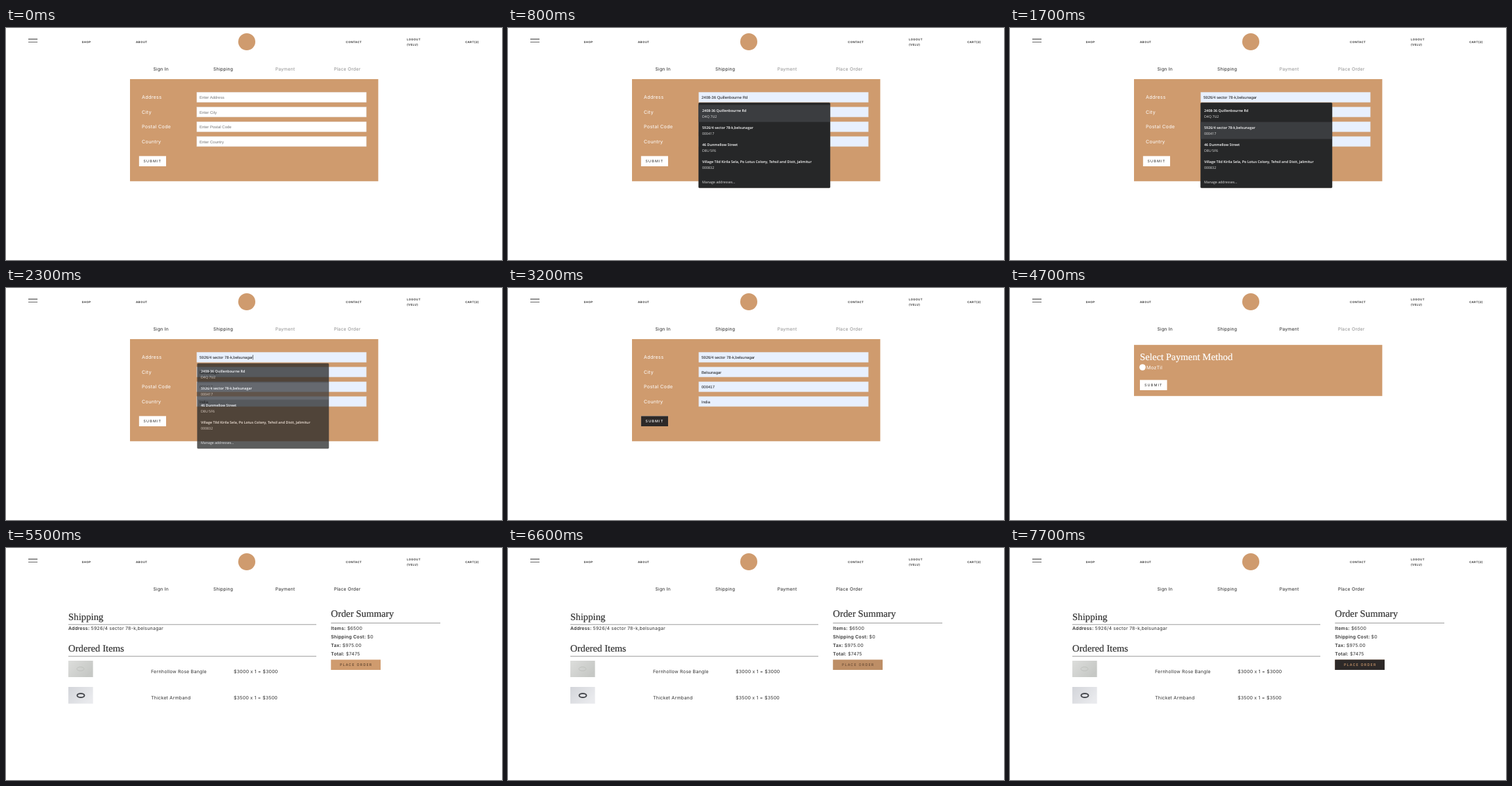
An HTML page that plays this animation: 756x354 px, repeating every 8000 ms.

```html
<!DOCTYPE html>
<html lang="en">
<head>
<meta charset="utf-8">
<title>Checkout</title>
<style>
html, body { margin: 0; width: 100%; height: 100%; overflow: hidden; background: #fff; }
svg { display: block; width: 100%; height: 100%; text-rendering: geometricPrecision; }
text { font-family: Inter, sans-serif; white-space: pre; }
.nav { font-size: 4.4px; font-weight: 600; letter-spacing: .4px; fill: #222; }
.tab { font-size: 6.8px; letter-spacing: .25px; text-anchor: middle; }
.label { font-size: 7.3px; letter-spacing: .25px; fill: #fff; }
.body { font-size: 7.1px; letter-spacing: .2px; fill: #333; }
.body tspan { font-weight: 600; }
.btn { font-size: 5.4px; letter-spacing: 1.15px; }
.head { font: 14.8px "Liberation Serif", serif; stroke-width: .2; }
.field { font: 6px "Liberation Sans", Arial, sans-serif; }
.opt { font: 600 5.4px "Open Sans", sans-serif; fill: #fff; }
.sub { font: 5.3px "Open Sans", sans-serif; fill: #e4e4e4; }
</style>
</head>
<body>
<svg id="stage" viewBox="0 0 756 354"></svg>
<script>
const LOOP = 8000;
const TAN = '#cf9b6e', DARK = '#2d2928', INK = '#222', MUTED = '#8c8c8c';

const FORM = [
  ['Address', 'Enter Address'],
  ['City', 'Enter City'],
  ['Postal Code', 'Enter Postal Code'],
  ['Country', 'Enter Country']
];
const SAVED = [
  ['2408-36 Quillenbourne Rd', 'D4Q 7U2'],
  ['5926/4 sector 78-k,belsunagar', '000417'],
  ['46 Dunmellow Street', 'D8U 5F6'],
  ['Village Tild Kirila Sela, Po Lotus Colony, Tehsil and Distt, Jalimitur', '000832']
];
const FILLED = [SAVED[1][0], 'Belsunagar', SAVED[1][1], 'India'];
const TABS = [['Sign In', 236.3], ['Shipping', 331.2], ['Payment', 425.6], ['Place Order', 520.2]];
const ROW = 22.5, OPTION = 26;

const text = (x, y, str, cls, attrs = '') => `<text x="${x}" y="${y}" class="${cls}" ${attrs}>${str}</text>`;
const rect = (x, y, w, h, fill, attrs = '') =>
  `<rect x="${x}" y="${y}" width="${w}" height="${h}" fill="${fill}" ${attrs}/>`;
const rule = (x1, x2, y, color, width = 1) =>
  `<path d="M${x1} ${y}H${x2}" stroke="${color}" stroke-width="${width}"/>`;
const group = (id, inner) => `<g id="${id}">${inner}</g>`;
const heading = (x, y, str, color) => text(x, y, str, 'head', `fill="${color}" stroke="${color}"`);
const pair = (x, y, key, value) => text(x, y, `<tspan>${key}:</tspan> ${value}`, 'body');

function button(id, x, y, w, label, pad, base, ink, hoverInk) {
  const face = (bg, fg, weight) => rect(x, y, w, 15.6, bg) +
    text(x + pad, y + 10, label, 'btn', `fill="${fg}" font-weight="${weight}"`);
  return face(base, ink, 400) + group(id, face(DARK, hoverInk, 500));
}

function header() {
  return rule(34, 48, 17, INK) + rule(34, 48, 21.5, '#666') +
    text(115.5, 23.1, 'SHOP', 'nav') + text(198, 23.1, 'ABOUT', 'nav') +
    `<circle cx="367" cy="21" r="13" fill="${TAN}"/>` +
    text(518, 23.1, 'CONTACT', 'nav') + text(611, 19.1, 'LOGOUT', 'nav') +
    text(611, 27.1, '(VELU)', 'nav') + text(700, 23.1, 'CART(2)', 'nav') +
    TABS.map(([name, x], i) => text(x, 65.2, name, 'tab', `id="tab${i}"`)).join('');
}

function shippingPage() {
  const rows = FORM.map(([name], i) => {
    const y = 98 + i * ROW;
    return text(207, y + 10.3, name, 'label') +
      rect(290.8, y, 258.4, 15.4, '#fff', `id="box${i}" stroke="#d9cfc6" stroke-width=".5"`) +
      text(295, y + 10, '', 'field', `id="val${i}"`);
  }).join('');
  const options = SAVED.map(([name, code], i) =>
    text(296, 128 + i * OPTION, name, 'opt') + text(296, 137.4 + i * OPTION, code, 'sub')).join('');
  const list = rect(290.5, 114, 200.5, 130, '#262728', 'rx="1.5" stroke="#47423f" stroke-width=".5"') +
    `<rect id="mark" x="290.5" width="200.5" height="${OPTION}" fill="#3b3d40"/>` +
    options + text(296, 237.4, 'Manage addresses...', 'sub');
  return rect(189, 78, 378.4, 155.8, TAN) + rows +
    `<path id="caret" stroke="#111" stroke-width=".6"/>` +
    button('hoverShip', 202.8, 195.4, 41.2, 'SUBMIT', 6.7, '#fff', INK, '#fff') +
    group('list', list);
}

function paymentPage() {
  return rect(189, 86.8, 378.4, 78, TAN) +
    heading(198, 110.2, 'Select Payment Method', '#fff') +
    '<circle cx="202" cy="121" r="4.8" fill="#fff"/>' +
    text(208, 123.7, 'MozTil', 'label') +
    button('hoverPay', 198, 140.3, 41.4, 'SUBMIT', 7, '#fff', INK, '#fff');
}

function orderPage() {
  const item = (y, name, price) =>
    text(221, y, name, 'body') + text(347, y, `$${price} x 1 = $${price}`, 'body');
  const ring = (cx, cy, rx, ry, color, width) =>
    `<ellipse cx="${cx}" cy="${cy}" rx="${rx}" ry="${ry}" fill="none" stroke="${color}" stroke-width="${width}"/>`;
  return heading(95, 109.8, 'Shipping', '#333') + rule(95, 473, 116.8, '#999') +
    pair(95, 125.2, 'Address', FILLED[0]) +
    heading(95, 158.2, 'Ordered Items', '#333') + rule(95, 473, 165.2, '#999') +
    rect(95, 172, 37.6, 25, 'url(#cloth)') + ring(113.5, 184.5, 5.5, 3, '#b9bbb6', .8) +
    rect(95, 212, 37.6, 25.5, 'url(#snow)') + ring(114, 225, 5.5, 3, '#46484d', 2) +
    item(190.7, 'Fernhollow Rose Bangle', 3000) + item(231.1, 'Thicket Armband', 3500) +
    heading(495.3, 105.4, 'Order Summary', '#333') + rule(495.3, 662, 114.5, '#999') +
    [['Items', '$6500'], ['Shipping Cost', '$0'], ['Tax', '$975.00'], ['Total', '$7475']]
      .map(([k, v], i) => pair(495.3, 125.2 + i * 13, k, v)).join('') +
    button('hoverOrder', 495.3, 170.4, 75.7, 'PLACE ORDER', 13.6, TAN, '#4a3424', TAN);
}

const gradient = (id, a, b) => `<linearGradient id="${id}" x2="1" y2=".6">
  <stop stop-color="${a}"/><stop offset="1" stop-color="${b}"/></linearGradient>`;

const stage = document.getElementById('stage');
stage.innerHTML = `<defs>${gradient('cloth', '#dcdddb', '#c6c8c5')}${gradient('snow', '#d3d5da', '#e9eaed')}</defs>` +
  header() + group('shipping', shippingPage()) + group('payment', paymentPage()) + group('order', orderPage());

const $ = id => document.getElementById(id);
const set = (id, attrs) => { for (const k in attrs) $(id).setAttribute(k, attrs[k]); };
const ramp = (t, from, to) => Math.min(1, Math.max(0, (t - from) / (to - from)));
const ease = (t, from, to) => { const p = ramp(t, from, to); return p * p * (3 - 2 * p); };
const show = (id, on) => set(id, { display: on ? 'inline' : 'none' });

function drawForm(t) {
  const choice = t < 600 ? -1 : t < 1100 ? 0 : 1;
  const done = t >= 2200;
  FORM.forEach(([, hint], i) => {
    const value = choice < 0 ? '' : done ? FILLED[i] : i ? '' : SAVED[choice][0];
    $('val' + i).textContent = value || (choice < 0 ? hint : '');
    set('val' + i, { fill: value ? '#111' : '#757575' });
    set('box' + i, { fill: choice < 0 ? '#fff' : '#e8f0fe' });
  });

  show('mark', choice >= 0);
  set('mark', { y: 117.4 + Math.max(0, choice) * OPTION });
  set('list', {
    opacity: ramp(t, 250, 450) * (1 - ramp(t, 2200, 2600)),
    transform: t > 2200 ? 'translate(1 1)' : ''
  });

  show('caret', done && t < 2800);
  set('caret', { d: `M${295.3 + $('val0').getComputedTextLength()} 102V109.5` });
  set('hoverShip', { opacity: ease(t, 2850, 3200) });
}

function draw(t) {
  const page = t < 3400 ? 1 : t < 5500 ? 2 : 3;
  ['shipping', 'payment', 'order'].forEach((id, i) => show(id, page === i + 1));
  TABS.forEach((_, i) => set('tab' + i, { fill: i <= page ? INK : MUTED }));
  if (page === 1) drawForm(t);
  set('hoverPay', { opacity: ease(t, 4700, 5050) });
  set('hoverOrder', { opacity: ease(t, 6500, 7000) });
}

const start = performance.now();
function tick() {
  draw((performance.now() - start) % LOOP);
  requestAnimationFrame(tick);
}
tick();
</script>
</body>
</html>
```
